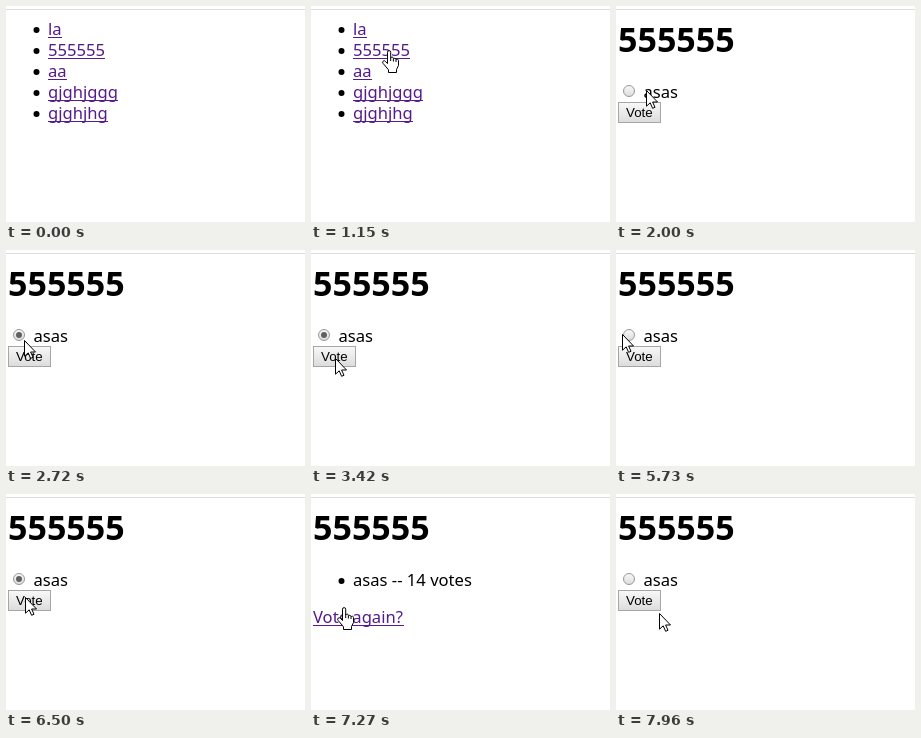
Write an HTML page that moves like this. It is 299 px wide and 216 px high and loops after 8 s.

```html
<!DOCTYPE html>
<html lang="en">
<head>
<meta charset="utf-8">
<title>Poll</title>
<style>
  html, body { margin: 0; width: 100%; height: 100%; overflow: hidden; background: #fff; }
  svg { display: block; width: 299px; height: 216px; font: 16.6px "Noto Sans", "Open Sans", sans-serif; }
  h1, .title { font-size: 34px; font-weight: 700; }
  .link { fill: #551a8b; }
  .link.active { fill: #e00; }
  .button { font: 13.33px "Liberation Sans", Arial, sans-serif; }
</style>
</head>
<body>
<svg viewBox="0 0 299 216">
  <defs>
    <linearGradient id="raised" x2="0" y2="1"><stop stop-color="#f8f8f8"/><stop offset="1" stop-color="#dcdcdc"/></linearGradient>
    <linearGradient id="sunken" x2="0" y2="1"><stop stop-color="#d6d6d6"/><stop offset="1" stop-color="#eee"/></linearGradient>
  </defs>
  <rect y="3" width="299" height="1" fill="#ddd"/>

  <g id="list"></g>

  <text id="title" class="title" x="2" y="46">555555</text>

  <g id="vote">
    <circle cx="13" cy="85" r="5.5" fill="url(#raised)" stroke="#999"/>
    <circle id="dot" cx="13" cy="85" r="3" fill="#606060"/>
    <text x="27.5" y="92">asas</text>
    <rect id="button" x="2.5" y="96.5" width="42" height="20" stroke="#a6a6a6"/>
    <text class="button" x="10" y="111">Vote</text>
  </g>

  <g id="results">
    <circle cx="30.5" cy="87" r="3"/>
    <text id="count" x="42" y="92"></text>
    <g id="again" class="link">
      <text x="2" y="129">Vote again?</text>
      <rect x="2" y="131" width="91" height="1"/>
    </g>
  </g>

  <g id="cursor" fill="#fff" stroke="#000" stroke-linejoin="round">
    <path id="arrow" d="M.5 .5V16.2L4.2 12.8L6.6 18.3L9 17.3L6.6 12H11.5Z"/>
    <path id="hand" transform="translate(-6 0)" d="M5.5 13.5V2.2a1.6 1.6 0 0 1 3.2 0V8
      a1.4 1.4 0 0 1 2.7 .4V9a1.4 1.4 0 0 1 2.6 .5V10a1.3 1.3 0 0 1 2.5 .5V15.5
      L14.5 19.5V22.5H6.5V19.8L1 13.3a1.5 1.5 0 0 1 2.3-2ZM8.7 8V11M11.4 9V11.5M14 10V12"/>
  </g>
</svg>
<script>
const LOOP = 8000;
const el = id => document.getElementById(id);
const show = (id, on) => el(id).setAttribute('visibility', on ? 'visible' : 'hidden');
const during = (t, ...spans) => spans.some(([from, to]) => t >= from && t < to);

el('list').innerHTML = ['la', '555555', 'aa', 'gjghjggg', 'gjghjhg'].map((label, i) => `
  <circle cx="30.5" cy="${24 + 21 * i}" r="3"/>
  <g class="link" id="item${i}">
    <text x="42" y="${29 + 21 * i}">${label}</text>
    <rect x="42" y="${31 + 21 * i}" height="1"/>
  </g>`).join('');
for (const item of el('list').querySelectorAll('.link')) {
  const width = item.querySelector('text').getComputedTextLength();
  item.querySelector('rect').setAttribute('width', Math.round(width));
}

const pages = [[0, 'list'], [1530, 'vote'], [3730, 'results'], [4800, 'vote'], [6890, 'results'], [7730, 'vote']];
const pageAt = t => pages.filter(([start]) => t >= start).pop()[1];

// Stepped pointer moves: first step, last step, step count, destination
const moves = [
  [300, 300, 1, 228, 146], [370, 610, 4, 92, 18], [690, 770, 2, 73, 50],
  [1070, 1150, 2, 77, 44], [1850, 2000, 3, 30, 84], [2250, 2400, 3, 14, 78],
  [2630, 2950, 5, 24, 108], [4110, 4500, 6, 48, 124], [5030, 5490, 7, 13, 92],
  [5660, 5730, 2, 6, 84], [5810, 5810, 1, 1, 73], [5890, 5890, 1, 10, 78],
  [6200, 6500, 5, 19, 103], [6580, 6580, 1, 23, 107],
  [7270, 7430, 3, 50, 126], [7730, 7960, 4, 43, 119]
];

function pointerAt(t) {
  let x = 228, y = 146, movedAt = 0;
  for (const [from, to, steps, toX, toY] of moves) {
    if (t < from) break;
    const gap = (to - from) / (steps - 1) || 1;
    const done = Math.min(steps, Math.floor((t - from) / gap + 1e-6) + 1);
    x += (toX - x) * done / steps;
    y += (toY - y) * done / steps;
    movedAt = from + (done - 1) * gap;
  }
  return { x: Math.round(x), y: Math.round(y), movedAt };
}

function overLink(page, x, y) {
  if (page === 'list') return x >= 42 && x < 99 && y >= 34 && y < 55;
  return page === 'results' && x >= 2 && x < 93 && y >= 113 && y < 134;
}

function draw(t) {
  const page = pageAt(t);
  for (const name of ['list', 'vote', 'results']) show(name, page === name);
  show('title', page !== 'list');
  show('dot', during(t, [2630, 3730], [6120, 6890]));
  const pressed = during(t, [3250, 3420], [6650, 6810]);
  el('button').setAttribute('fill', `url(#${pressed ? 'sunken' : 'raised'})`);
  el('count').textContent = `asas -- ${t < 6000 ? 13 : 14} votes`;
  el('item1').classList.toggle('active', during(t, [1220, 1300]));
  el('again').classList.toggle('active', during(t, [4580, 4650], [7580, 7730]));

  // The pointer shape only updates when the pointer moves
  const { x, y, movedAt } = pointerAt(t);
  const isHand = overLink(pageAt(movedAt), x, y);
  el('cursor').setAttribute('transform', `translate(${x} ${y})`);
  show('arrow', t >= 300 && !isHand);
  show('hand', t >= 300 && isHand);
}

const start = performance.now();
function tick() {
  draw((performance.now() - start) % LOOP);
  requestAnimationFrame(tick);
}
tick();
</script>
</body>
</html>
```
